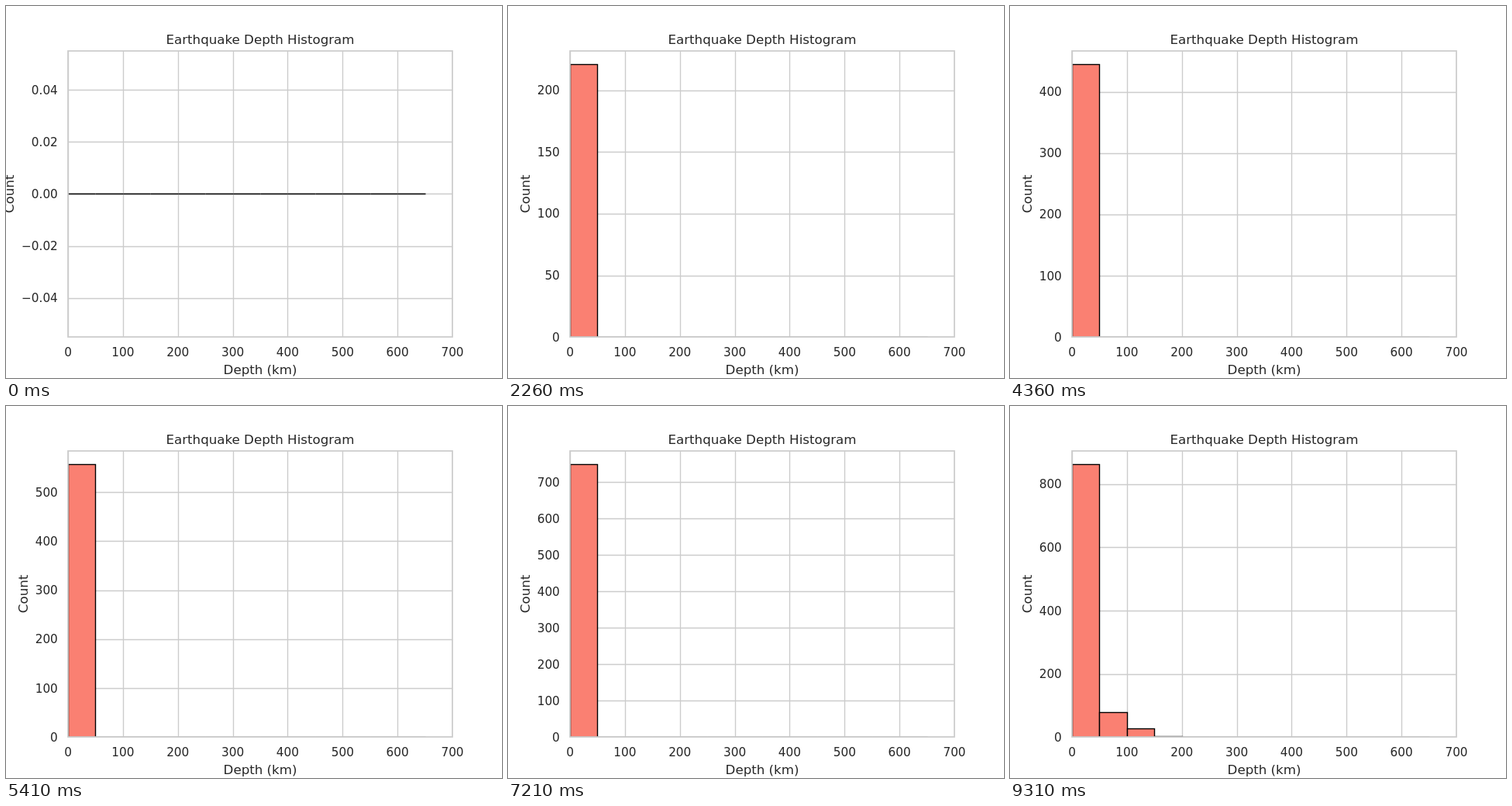
An HTML page with a canvas that plays this animation: 640x480 px, repeating every 9.46 s.

```html
<!DOCTYPE html>
<html lang="en">
<head>
<meta charset="utf-8">
<title>Earthquake Depth Histogram</title>
<style>
  html, body { margin: 0; width: 100%; height: 100%; overflow: hidden; background: #fff; }
  canvas { display: block; }
</style>
</head>
<body>
<canvas id="chart" width="640" height="480"></canvas>
<script>
const ctx = document.getElementById('chart').getContext('2d');
const LEFT = 80, RIGHT = 576, TOP = 57.6, BOTTOM = 427.2, HEIGHT = BOTTOM - TOP;
const LOOP = 9460, FIRST = 310, STEP = 150, BATCH = 16;
const BELOW_ZERO = 3;            // depths above sea level fall outside the bins
const TOTALS = [863, 78, 27, 3]; // events per 50 km, added from shallow to deep
const BINS = 13;
const THIN = 1.389, THICK = 1.736;

const xAt = km => LEFT + km / 700 * (RIGHT - LEFT);
const snap = v => Math.floor(v + 0.5) + 0.5;

function line(x1, y1, x2, y2) {
  ctx.beginPath();
  ctx.moveTo(x1, y1);
  ctx.lineTo(x2, y2);
  ctx.stroke();
}

function text(str, x, y, pt, align = 'center') {
  ctx.font = `${pt / 0.72}px "DejaVu Sans", sans-serif`;
  ctx.textAlign = align;
  ctx.fillText(str, x, y);
}

function countsAt(step) {
  let left = Math.max(0, step * BATCH - BELOW_ZERO);
  return Array.from({ length: BINS }, (_, i) => {
    const n = Math.min(left, TOTALS[i] || 0);
    left -= n;
    return n;
  });
}

// Smallest round step that gives at most nine intervals
function tickStep(range) {
  const raw = range / 9, unit = 10 ** Math.floor(Math.log10(raw));
  return unit * [1, 2, 2.5, 5, 10].find(m => m * unit >= raw - 1e-9);
}

function draw(step) {
  const counts = countsAt(step), peak = counts[0];
  const max = peak ? peak * 1.05 : 0.055, min = peak ? 0 : -0.055;
  const yAt = v => BOTTOM - (v - min) / (max - min) * HEIGHT;
  const gap = tickStep(max - min);
  const ticks = [];
  for (let i = Math.ceil(min / gap); i * gap <= max; i++) ticks.push(i * gap);

  ctx.fillStyle = '#fff';
  ctx.fillRect(0, 0, 640, 480);

  ctx.save();
  ctx.beginPath();
  ctx.rect(80, 58, 496, 369);
  ctx.clip();
  ctx.lineWidth = THIN;
  ctx.strokeStyle = '#ccc';
  for (let km = 0; km <= 700; km += 100) line(snap(xAt(km)), TOP, snap(xAt(km)), BOTTOM);
  for (const v of ticks) line(LEFT, snap(yAt(v)), RIGHT, snap(yAt(v)));

  ctx.strokeStyle = '#000';
  ctx.fillStyle = '#fa8072';
  counts.forEach((n, i) => {
    const x1 = snap(xAt(i * 50)), x2 = snap(xAt(i * 50 + 50));
    const base = snap(yAt(0)), y = snap(yAt(n));
    if (!n) return line(x1, base, x2, base);
    ctx.fillRect(x1, y, x2 - x1, base - y);
    ctx.strokeRect(x1, y, x2 - x1, base - y);
  });
  ctx.restore();

  ctx.lineWidth = THICK;
  ctx.strokeStyle = '#ccc';
  ctx.strokeRect(80, 58, 496, 369);

  ctx.fillStyle = '#262626';
  for (let km = 0; km <= 700; km += 100) text(km, xAt(km), 452, 11);
  let widest = 0;
  for (const v of ticks) {
    const label = (peak ? String(v) : v.toFixed(2)).replace('-', '\u2212');
    text(label, 66.8, Math.round(yAt(v) + 5.5), 11, 'right');
    widest = Math.max(widest, ctx.measureText(label).width);
  }
  text('Earthquake Depth Histogram', 328, 49, 12);
  text('Depth (km)', 328, 475, 12);
  ctx.save();
  ctx.translate(Math.round(57.2 - widest), 242.4);
  ctx.rotate(-Math.PI / 2);
  text('Count', 0, 0, 12);
  ctx.restore();
}

const start = performance.now();
let shown = -1;
function frame() {
  const t = (performance.now() - start) % LOOP;
  const step = Math.max(0, Math.floor((t - FIRST) / STEP) + 1);
  if (step !== shown) draw(shown = step);
  requestAnimationFrame(frame);
}
frame();
</script>
</body>
</html>
```
